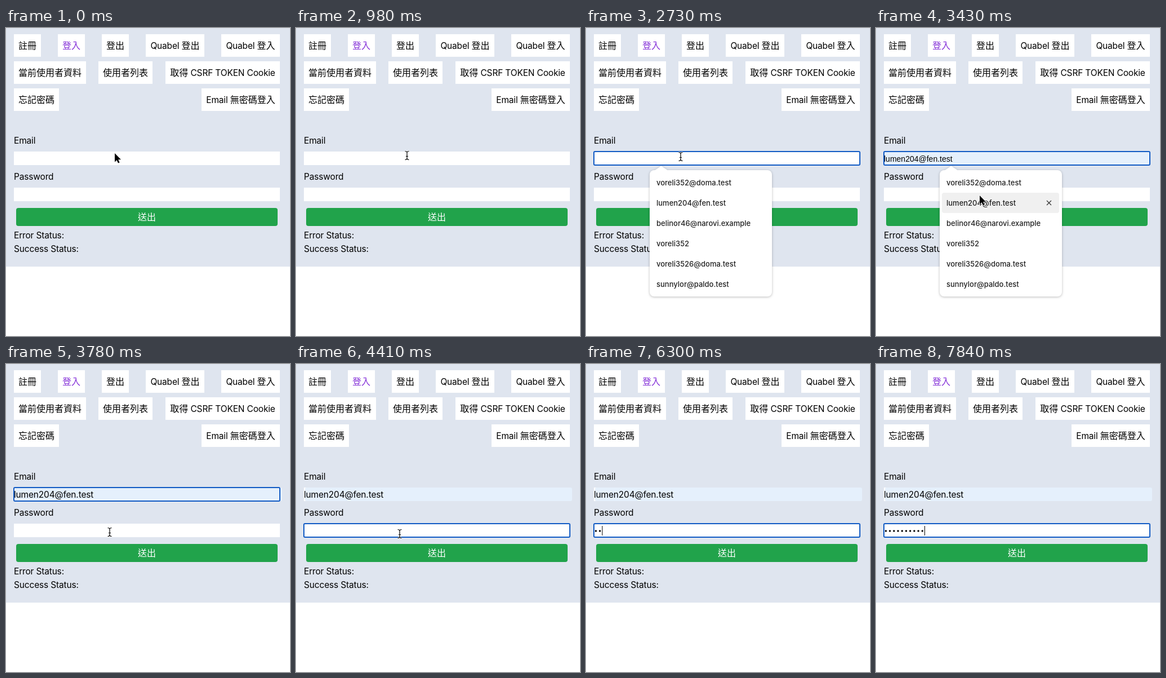
An HTML page for the animation above (8 s loop, 504 by 546 pixels).

```html
<!DOCTYPE html>
<html lang="zh-Hant">
<head>
<meta charset="utf-8">
<title>Login form</title>
<style>
  html, body { margin: 0; width: 100%; height: 100%; overflow: hidden; background: #fff; }
  svg { display: block; width: 504px; height: 546px; }
  text { font: 16px "Noto Sans CJK TC", "Noto Sans CJK JP", "Noto Sans CJK", sans-serif; fill: #000; }
  .latin { font: 15.5px Inter, sans-serif; letter-spacing: -.17px; }
  .mid { text-anchor: middle; }
  .current { fill: #8430d8; }
  .send { fill: #fff; font-weight: 500; }
  .preview { font: 14px "Liberation Sans", Arial, sans-serif; }
  .item { font: 500 13px Inter, sans-serif; fill: #222; }
  .field { fill: #fff; }
  .filled { fill: #e5f0fc; }
  .ring { fill: none; stroke: #125bc4; stroke-width: 2; }
  #menu { filter: drop-shadow(0 1px 2px #0004); }

  .step { animation: 8s step-end infinite; }
  #emailRing { animation-name: emailRing; }
  #passRing { animation-name: passRing; }
  #menu { animation-name: menu; }
  .firstRow { animation-name: firstRow; }
  .secondRow { animation-name: secondRow; }
  #emailCaret { animation-name: emailCaret; }
  #previewFill { animation-name: previewFill; }
  #done { animation-name: done; }
  #typed { animation-name: typed; }
  #passCaret { animation-name: passCaret; }
  #arrow { animation-name: arrow; }
  #beam { animation-name: beam; }
  #pointer { animation: travel 8s ease-in-out infinite; }

  @keyframes emailRing { 0%, 49% { opacity: 0 } 33.25% { opacity: 1 } }
  @keyframes passRing { 0% { opacity: 0 } 49%, 100% { opacity: 1 } }
  @keyframes menu { 0%, 45.5% { opacity: 0 } 33.25% { opacity: 1 } }
  @keyframes firstRow { 0%, 39.375% { opacity: 0 } 37.5% { opacity: 1 } }
  @keyframes secondRow { 0%, 45.5% { opacity: 0 } 39.375% { opacity: 1 } }
  @keyframes emailCaret { 0%, 37.5% { opacity: 0 } 33.25% { opacity: 1 } }
  @keyframes previewFill { 0%, 45.5% { opacity: 0 } 37.5% { opacity: 1 } }
  @keyframes done { 0% { opacity: 0 } 45.5%, 100% { opacity: 1 } }
  @keyframes passCaret {
    0%, 55.125%, 67.375% { opacity: 0 }
    49%, 61.25%, 74.375%, 100% { opacity: 1 }
  }
  @keyframes typed {
    0% { transform: none }
    74.375% { transform: translateX(7.2px) }
    76.125% { transform: translateX(14.4px) }
    81.375% { transform: translateX(21.6px) }
    84% { transform: translateX(28.8px) }
    86.625% { transform: translateX(36px) }
    88.375% { transform: translateX(43.2px) }
    91% { transform: translateX(50.4px) }
    93.625% { transform: translateX(57.6px) }
    96.25% { transform: translateX(64.8px) }
    98%, 100% { transform: translateX(72px) }
  }
  @keyframes arrow { 0%, 37.5% { opacity: 1 } .875%, 45.5%, 100% { opacity: 0 } }
  @keyframes beam { 0%, 37.5%, 74.375%, 100% { opacity: 0 } .875%, 45.5% { opacity: 1 } }
  @keyframes travel {
    0% { transform: translate(193px, 222px) }
    6.125%, 26.25% { transform: translate(197px, 226px) }
    29.75%, 35.875% { transform: translate(168px, 228px) }
    40.25%, 46.375% { transform: translate(184px, 297px) }
    49%, 100% { transform: translate(184px, 301px) }
  }
</style>
</head>
<body>
<svg viewBox="0 0 504 546">
  <rect width="504" height="423" fill="#dfe5ef"/>
  <g id="nav"></g>

  <text class="latin" x="14" y="205">Email</text>
  <rect class="field" x="14" y="219" width="472" height="24"/>
  <rect id="previewFill" class="filled step" x="14" y="219" width="472" height="24"/>
  <g id="done" class="step">
    <rect class="filled" x="16" y="219" width="474" height="24" rx="3"/>
    <text class="latin" x="14" y="237">lumen204@fen.test</text>
  </g>
  <text class="preview step firstRow" x="14" y="237">voreli352@doma.test</text>
  <text class="preview step secondRow" x="14" y="237">lumen204@fen.test</text>
  <rect id="emailCaret" class="step" x="14" y="223" width="1" height="17"/>
  <rect id="emailRing" class="ring step" x="14" y="219" width="472" height="24" rx="2"/>

  <text class="latin" x="14" y="269">Password</text>
  <rect class="field" x="14" y="283" width="472" height="24"/>
  <g id="dots"></g>
  <g id="typed" class="step">
    <rect class="field" x="14" y="285" width="80" height="20"/>
    <rect id="passCaret" class="step" x="14" y="287" width="1" height="17"/>
  </g>
  <rect id="passRing" class="ring step" x="14" y="283" width="472" height="24" rx="2"/>

  <rect x="18" y="319" width="464" height="32" rx="4" fill="#21a34b"/>
  <text class="send mid" x="250" y="341">送出</text>
  <text class="latin" x="14" y="373">Error Status:</text>
  <text class="latin" x="14" y="397">Success Status:</text>

  <g id="menu" class="step">
    <path d="M121 253L133.500 244.500L146 253Z" fill="#fff"/>
    <rect x="113" y="252" width="217" height="224" rx="8" fill="#fff"/>
    <g class="step firstRow">
      <rect x="117" y="256" width="208" height="36" rx="4" fill="#f0f0f0"/>
      <path d="M303 270l8 8m0-8l-8 8" stroke="#333" stroke-width="1.200"/>
    </g>
    <g class="step secondRow">
      <rect x="117" y="292" width="208" height="36" rx="4" fill="#f0f0f0"/>
      <path d="M303 306l8 8m0-8l-8 8" stroke="#333" stroke-width="1.200"/>
    </g>
    <g id="items"></g>
  </g>

  <g id="pointer">
    <path id="arrow" class="step" d="M0 0V15.500L3.600 12.200L6 17.600L8.600 16.500L6.200 11.200H11Z"
      stroke="#fff" stroke-width="1.200" paint-order="stroke"/>
    <g id="beam" class="step" fill="none">
      <path id="beamShape" d="M-3.500-7.500Q0-7.500 0-5V5Q0 7.500-3.500 7.500M3.500-7.500Q0-7.500 0-5M0 5Q0 7.500 3.500 7.500M-2 1.500H2"
        stroke="#fff" stroke-width="2.600"/>
      <use href="#beamShape" style="display:none"/>
      <path d="M-3.500-7.500Q0-7.500 0-5V5Q0 7.500-3.500 7.500M3.500-7.500Q0-7.500 0-5M0 5Q0 7.500 3.500 7.500M-2 1.500H2"
        stroke="#000" stroke-width="1.200"/>
    </g>
  </g>
</svg>
<script>
  const fill = (id, list, draw) => {
    document.getElementById(id).innerHTML = list.map(draw).join('');
  };
  const latin = s => s.replace(/[ -~]+/g, '<tspan class="latin">$&</tspan>');

  // x, y, width, label
  const links = [
    [14, 11, 48, '註冊'], [92, 11, 48, '登入'], [170, 11, 48, '登出'],
    [248, 11, 104, 'Quabel 登出'], [382, 11, 104, 'Quabel 登入'],
    [14, 59, 128, '當前使用者資料'], [164, 59, 96, '使用者列表'],
    [283, 59, 203, '取得 CSRF TOKEN Cookie'],
    [14, 107, 80, '忘記密碼'], [347, 107, 139, 'Email 無密碼登入']
  ];
  fill('nav', links, ([x, y, w, label]) =>
    `<rect class="field" x="${x}" y="${y}" width="${w}" height="40"/>
     <text class="mid${label === '登入' ? ' current' : ''}" x="${x + w / 2}" y="${y + 26}">${latin(label)}</text>`);

  const accounts = ['voreli352@doma.test', 'lumen204@fen.test', 'belinor46@narovi.example',
    'voreli352', 'voreli3526@doma.test', 'sunnylor@paldo.test'];
  fill('items', accounts, (name, i) => `<text class="item" x="125" y="${279 + 36 * i}">${name}</text>`);

  fill('dots', [...Array(10).keys()], i => `<circle cx="${17.5 + 7.2 * i}" cy="296" r="1.700"/>`);
</script>
</body>
</html>
```
